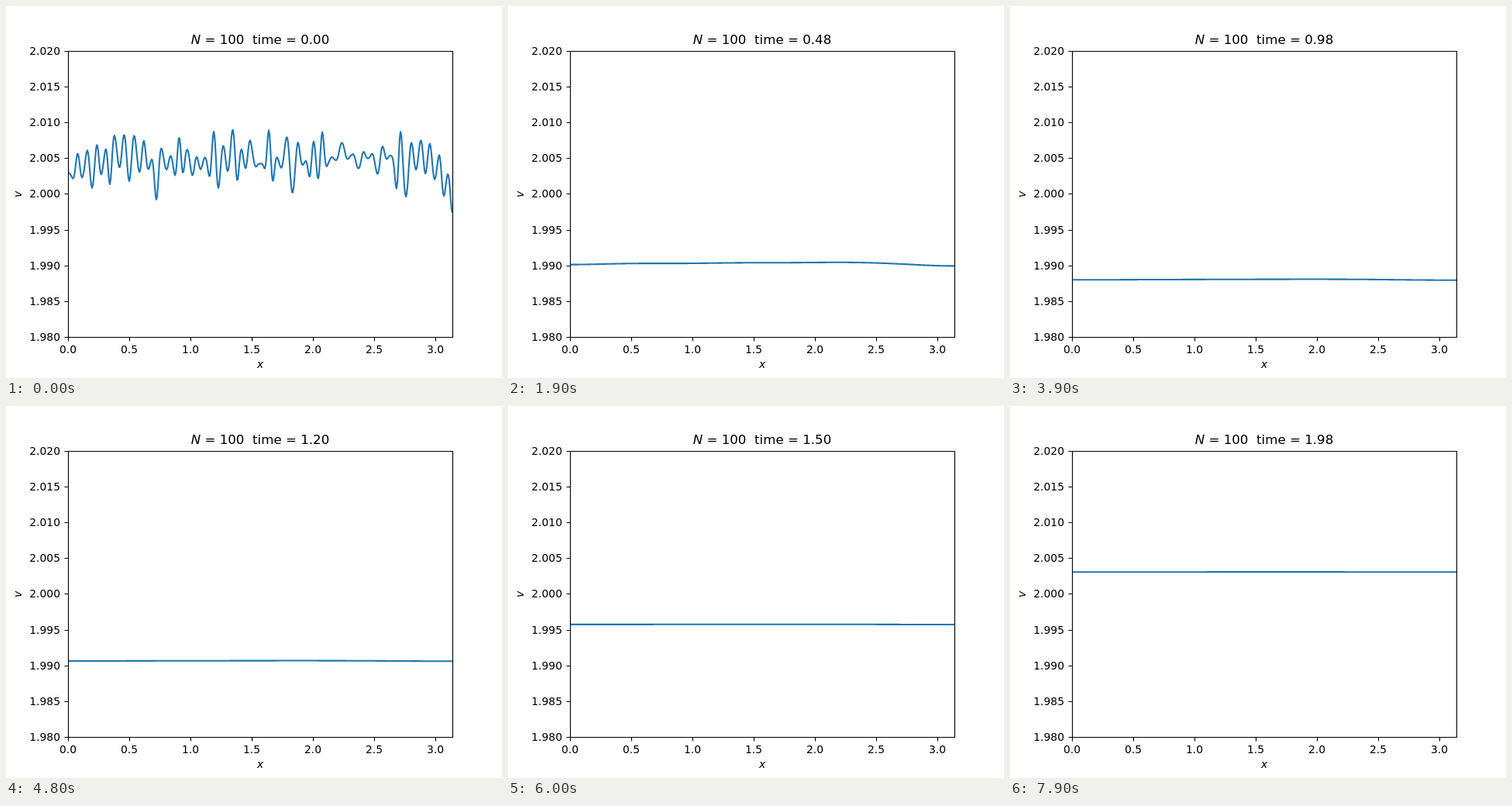
Recreate the animation shown at these times as an HTML page. Size 640 by 480 pixels, loop 8000 ms.

```html
<!DOCTYPE html>
<html lang="en">
<head>
<meta charset="utf-8">
<title>Damped reaction-diffusion</title>
<style>
  html, body { margin: 0; width: 100%; height: 100%; overflow: hidden; background: #fff; }
  svg { display: block; font: 13.89px "DejaVu Sans", Verdana, sans-serif; }
  .mid { text-anchor: middle; }
  .end { text-anchor: end; }
  .it { font-style: italic; }
  #title { font-size: 16.67px; white-space: pre; }
  #curve { fill: none; stroke: #1f77b4; stroke-width: 2.08; stroke-linejoin: round; }
  #axes { fill: none; stroke: #000; stroke-width: 1.11; }
</style>
</head>
<body>
<svg width="640" height="480" viewBox="0 0 640 480">
  <clipPath id="plot"><rect x="80" y="57.6" width="496" height="369.6"/></clipPath>
  <path id="curve" clip-path="url(#plot)"/>
  <path id="axes"/>
  <g id="labels"></g>
  <text class="mid it" x="328" y="467">x</text>
  <text class="mid it" transform="translate(20 243) rotate(-90)">v</text>
  <text id="title" class="mid" x="328" y="49"><tspan class="it">N</tspan><tspan id="clock"></tspan></text>
</svg>
<script>
const LEFT = 80, WIDTH = 496, RIGHT = LEFT + WIDTH, TOP = 57.6, BOTTOM = 427.2;
const MODES = 170, SLOW_MODES = 8, SLOW_TIME = 0.2;
const $ = id => document.getElementById(id);

let seed = 7;
function random() {
  seed = (seed * 16807) % 2147483647;
  return seed / 2147483647;
}

// Initial noise: crests and troughs in turn, with random spacing and height
function noise() {
  const points = [];
  for (let x = LEFT, side = -1; ; x += 4.5 + 2.9 * random(), side = -side) {
    points.push([x, side * (2 + 44 * random() ** 2)]);
    if (x > RIGHT) return points;
  }
}

// Cosine coefficients of a curve eased between its turning points
function spectrum(points) {
  const samples = [];
  for (let i = 0, j = 0; i < WIDTH; i++) {
    const x = LEFT + i + 0.5;
    while (x > points[j + 1][0]) j++;
    const [x0, y0] = points[j], [x1, y1] = points[j + 1];
    const ease = (1 - Math.cos(Math.PI * (x - x0) / (x1 - x0))) / 2;
    samples.push(y0 + (y1 - y0) * ease);
  }
  return Array.from({ length: MODES }, (_, k) => {
    let sum = 0;
    samples.forEach((y, i) => sum += y * Math.cos(Math.PI * k * (i + 0.5) / WIDTH));
    return sum * 2 / WIDTH;
  });
}

const fast = spectrum(noise());
// Turning points of the long waves left at SLOW_TIME
const slow = spectrum([[80, 271.4], [155, 265.4], [218, 267.9], [280, 264.9], [316, 265.7],
  [367, 264.7], [397, 265.2], [456, 263.4], [570, 273.8], [576, 273.8]]);

// The mean swings as a damped oscillator; every wave just fades
function level(t) {
  const phase = Math.sqrt(3.75) * t;
  return 242.95 - Math.exp(-t / 2) * (42.5 * Math.cos(phase) - 174.6 * Math.sin(phase));
}

function amplitude(k, t) {
  if (k === 0) return level(t);
  const fade = t => Math.exp(-(1.9 + 0.1 * k * k) * t);
  return k > SLOW_MODES ? fast[k] * fade(t) : slow[k] * fade(t - SLOW_TIME);
}

function curve(t) {
  const waves = fast.map((_, k) => [amplitude(k, t), k]).filter(([a]) => Math.abs(a) > 0.002);
  let d = "";
  for (let i = 0; i <= WIDTH; i++) {
    let y = 0;
    for (const [a, k] of waves) y += a * Math.cos(Math.PI * k * i / WIDTH);
    d += (i ? "L" : "M") + (LEFT + i) + " " + y.toFixed(3);
  }
  return d;
}

function drawAxes() {
  const snap = v => Math.floor(v + 0.5) + 0.5;
  let d = `M80.5 ${snap(TOP)}H576.5V${snap(BOTTOM)}H80.5Z`, labels = "";
  for (let i = 0; i < 9; i++) {
    const y = TOP + 46.2 * i;
    d += `M80.5 ${snap(y)}h-5`;
    labels += `<text class="end" x="70" y="${Math.round(y + 5)}">${(2.02 - 0.005 * i).toFixed(3)}</text>`;
  }
  for (let i = 0; i < 7; i++) {
    const x = LEFT + WIDTH * i / 2 / Math.PI;
    d += `M${snap(x)} 427.5v5`;
    labels += `<text class="mid" x="${Math.round(x)}" y="448">${(i / 2).toFixed(1)}</text>`;
  }
  $("axes").setAttribute("d", d);
  $("labels").innerHTML = labels;
}

let shown = -1;
function tick(now) {
  const step = Math.floor(now / 100) % 80;
  if (step !== shown) {
    shown = step;
    const t = step * 0.025;
    $("curve").setAttribute("d", curve(t));
    $("clock").textContent = ` = 100\u00a0 time = ${t.toFixed(2)}`;
  }
  requestAnimationFrame(tick);
}

drawAxes();
tick(0);
</script>
</body>
</html>
```
